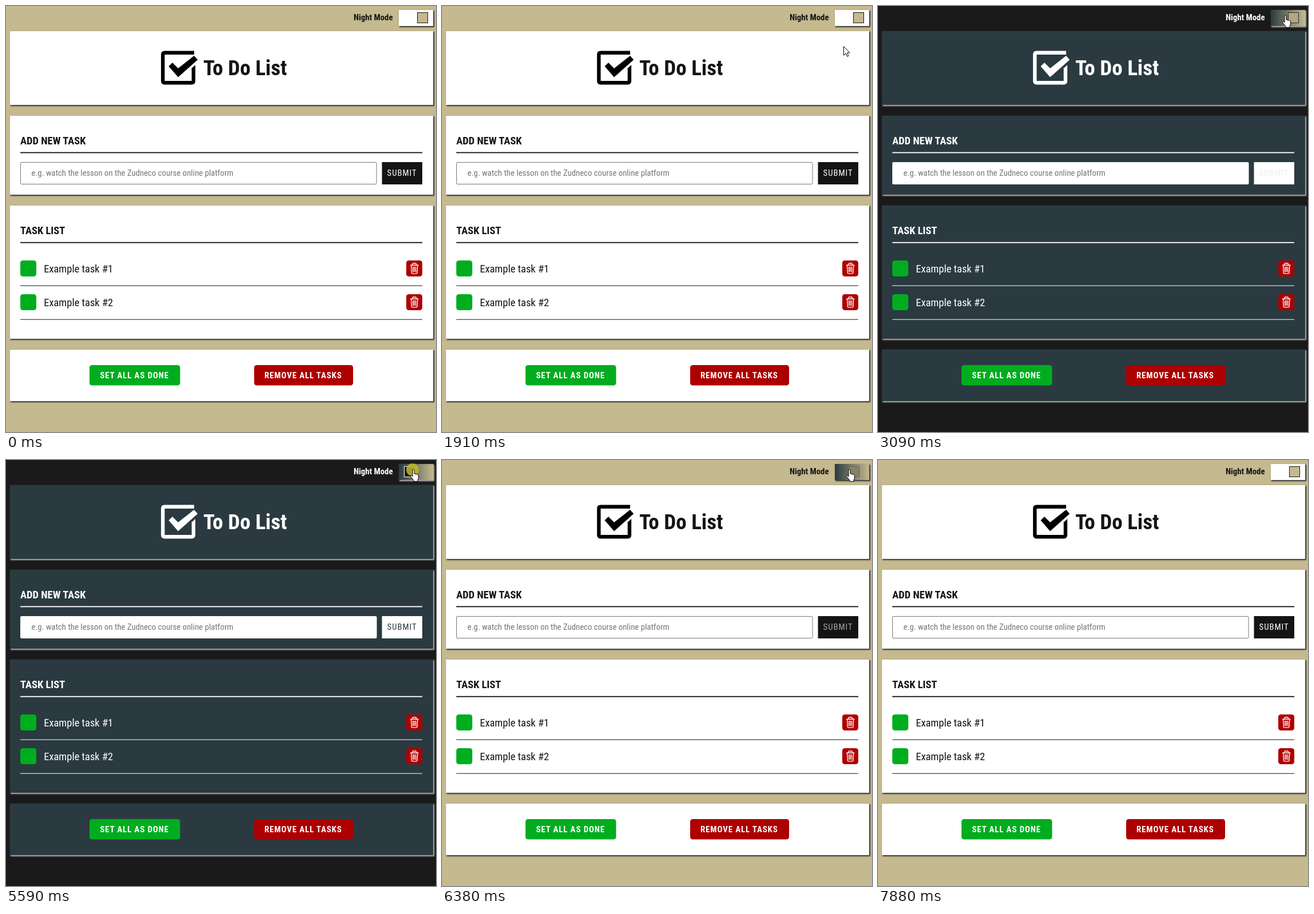
Recreate the animation shown at these times as an HTML page. Size 752 by 745 pixels, loop 8 s.

```html
<!DOCTYPE html>
<html lang="en">
<head>
<meta charset="utf-8">
<title>To Do List</title>
<style>
html, body { margin: 0; width: 100%; height: 100%; overflow: hidden; }

.stage {
  --page: #c4b98f; --panel: #fff; --ink: #141414; --tick: #000;
  --shadow: #333; --field: #767676; --button: #141414; --label: #fff;
  --knob: #c4b98f; --edge: #141414; --slide: 0px;
  position: relative; width: 752px; height: 745px; overflow: hidden;
  background: var(--page);
  animation: theme 8s step-end infinite;
}
.panel, .toggle {
  position: absolute; left: 6.5px; width: 740px;
  background: var(--panel);
  box-shadow: 1px 1px 2px .5px var(--shadow);
}
.toggle {
  left: 686.5px; top: 6.5px; width: 60px; height: 28px;
  background: #fff;
}
.toggle::before {
  content: ""; position: absolute; inset: 0;
  background: linear-gradient(90deg, #2b3a41, #c4b98f);
  animation: hover 8s step-end infinite;
}
svg { position: absolute; left: 0; top: 0; }

text {
  font: 400 14.8px "Roboto Condensed", Roboto, sans-serif;
  font-stretch: 75%;
  font-variation-settings: "wdth" 75;
  fill: var(--ink);
  white-space: pre;
}
.narrow text { transform-box: fill-box; transform-origin: 0 0; transform: scaleX(.885); }
.bold { font-weight: 700; }
.head { font-weight: 700; font-size: 18.5px; }
.task { font-size: 18.5px; }
.title { font-weight: 700; font-size: 37px; }
.caps { letter-spacing: .925px; }
.white { fill: #fff; }
.hint { fill: #757575; }
.submit { fill: var(--label); }
.rule { fill: var(--ink); }
.green { fill: #00ad1f; }
.red { fill: #ad0000; }
.knob {
  fill: var(--knob); stroke: var(--edge);
  transform: translateX(var(--slide));
}
.pointer { fill: #fff; stroke: #000; stroke-linejoin: round; }
.arrow { animation: arrow 8s step-end infinite; transform: translate(800px, 0); }
.hand { animation: hand 8s step-end infinite; transform: translate(800px, 0); }
.click { fill: #bdb62a; opacity: 0; animation: click 8s step-end infinite; }

@keyframes theme {
  38.625% {
    --page: #1a1a1a; --panel: #2b3a41; --ink: #fff; --tick: #fff;
    --shadow: #b4b4b4; --field: #fff; --button: #fff; --label: #eee;
    --knob: #b0a781; --edge: #303030; --slide: -2px;
  }
  40.25% { --label: #626d72; --knob: #464338; --edge: #c2c2c2; --slide: -17px; }
  41.875% { --label: #2b3a41; --knob: #1a1a1a; --edge: #fff; --slide: -23px; }
  79.75% {
    --page: #c4b98f; --panel: #fff; --ink: #141414; --tick: #000;
    --shadow: #333; --field: #767676; --button: #141414; --label: #a0a3a5;
    --knob: #888166; --edge: #666; --slide: -8px;
  }
  81.375% { --label: #f4f5f5; --knob: #bfb48b; --edge: #1b1b1b; --slide: -1px; }
  82.875% { --label: #fff; --knob: #c4b98f; --edge: #141414; --slide: 0px; }
}
@keyframes hover {
  0%, 84.375%, 100% { opacity: 0; }
  27.125% { opacity: 1; }
}
@keyframes click {
  0%, 38.625%, 78.25%, 100% { opacity: 0; }
  33.625%, 69.875% { opacity: .88; }
}
@keyframes hand {
  0%, 84.375%, 100% { transform: translate(800px, 0); }
  27.125% { transform: translate(707px, 20px); }
  28.625% { transform: translate(707px, 16px); }
}
@keyframes arrow {
  0%, 27.125%, 98.5%, 100% { transform: translate(800px, 0); }
  5% { transform: translate(664px, 721px); }
  6.5% { transform: translate(638px, 650px); }
  8% { transform: translate(619px, 574px); }
  9.625% { transform: translate(611px, 502px); }
  11.125% { transform: translate(616px, 444px); }
  12.625% { transform: translate(630px, 400px); }
  14.375% { transform: translate(641px, 358px); }
  15.875% { transform: translate(653px, 308px); }
  17.5% { transform: translate(665px, 256px); }
  19.125% { transform: translate(678px, 202px); }
  20.75% { transform: translate(689px, 152px); }
  22.5% { transform: translate(698px, 100px); }
  23.875% { transform: translate(702px, 70px); }
  25.625% { transform: translate(706px, 46px); }
  84.375% { transform: translate(698px, 60px); }
  85.875% { transform: translate(676px, 140px); }
  87.375% { transform: translate(656px, 222px); }
  89.125% { transform: translate(647px, 335px); }
  90.625% { transform: translate(651px, 442px); }
  92.25% { transform: translate(666px, 548px); }
  93.75% { transform: translate(692px, 642px); }
  95.375% { transform: translate(723px, 722px); }
  97.125% { transform: translate(723px, 734px); }
}
</style>
</head>
<body>
<div class="stage">
  <div class="toggle"></div>
  <div class="panel" style="top:43.5px;height:129.5px"></div>
  <div class="panel" style="top:192px;height:138px"></div>
  <div class="panel" style="top:349px;height:233px"></div>
  <div class="panel" style="top:601px;height:90px"></div>

  <svg width="752" height="745">
    <defs>
      <g id="trash" fill="none" stroke="#fff" stroke-width="1.4">
        <path d="M7 8.3H21.5M11 8V6.2q0-1.2 1.2-1.2h4q1.2 0 1.2 1.2V8"/>
        <path d="M8.6 8.5L9.3 21.3q.1 1.6 1.6 1.6h6.6q1.5 0 1.6-1.6L19.8 8.5"/>
        <path d="M11.8 10.8V20.3M14.2 10.8V20.3M16.6 10.8V20.3"/>
      </g>
    </defs>

    <text class="bold" id="probe" x="608" y="25">Night Mode</text>
    <rect class="knob" x="719.5" y="11.5" width="18" height="18"/>

    <path d="M329 81.7H277.5q-3.2 0-3.2 3.2V131q0 3.2 3.2 3.2h47.2q3.2 0 3.2-3.2V108" fill="none" stroke="var(--tick)" stroke-width="6.4"/>
    <path d="M324.7 109L331.1 103V109ZM284.5 105.5L291 99L301 109L329 87L335.2 94L301 124.5Z" fill="var(--tick)"/>
    <text class="title" x="345" y="121.3">To Do List</text>

    <text class="head" x="25" y="242">ADD NEW TASK</text>
    <rect class="rule" x="25" y="255.5" width="703" height="1.85"/>
    <rect x="25.5" y="273.5" width="622.5" height="38" rx="1.5" fill="#fff" stroke="var(--field)"/>
    <text class="hint" x="44.5" y="297.2">e.g. watch the lesson on the Zudneco course online platform</text>
    <rect x="657.5" y="273" width="70.5" height="39" fill="var(--button)"/>
    <text class="submit caps" x="666.6" y="297.2">SUBMIT</text>

    <text class="head" x="25" y="399.3">TASK LIST</text>
    <rect class="rule" x="25" y="412.8" width="703" height="1.85"/>

    <rect class="green" x="25" y="445" width="28" height="28" rx="4.6"/>
    <text class="task" x="66.2" y="465.8">Example task #1</text>
    <rect class="red" x="700" y="445" width="28" height="28" rx="4.6"/>
    <use href="#trash" x="700" y="445"/>
    <rect class="rule" x="25" y="488.6" width="703" height="1"/>

    <rect class="green" x="25" y="504" width="28" height="28" rx="4.6"/>
    <text class="task" x="66.2" y="525">Example task #2</text>
    <rect class="red" x="700" y="504" width="28" height="28" rx="4.6"/>
    <use href="#trash" x="700" y="504"/>
    <rect class="rule" x="25" y="547.7" width="703" height="1"/>

    <rect class="green" x="146" y="628" width="158.5" height="35.5" rx="4.6"/>
    <text class="bold caps white" x="164.4" y="650.8">SET ALL AS DONE</text>
    <rect class="red" x="434" y="628" width="173" height="35.5" rx="4.6"/>
    <text class="bold caps white" x="452" y="650.8">REMOVE ALL TASKS</text>

    <circle class="click" cx="711" cy="17" r="11"/>
    <path class="pointer arrow" d="M.5 .7V16.2L4.2 12.8L6.7 18.4L9 17.3L6.6 11.8H11.2Z"/>
    <path class="pointer hand" d="M4 13V2.2a1.5 1.5 0 0 1 3 0V8l5.5 1.3q2 .6 2 2.5v4l-1.5 3.5v2.2H6v-2L1 13.5q-1-1.5 .2-2.2t2 .5z"/>
  </svg>
</div>
<script>
// Narrow the text evenly where no condensed face is available.
const probe = document.getElementById("probe");
if (probe.getComputedTextLength() > 73) document.body.classList.add("narrow");
</script>
</body>
</html>
```
